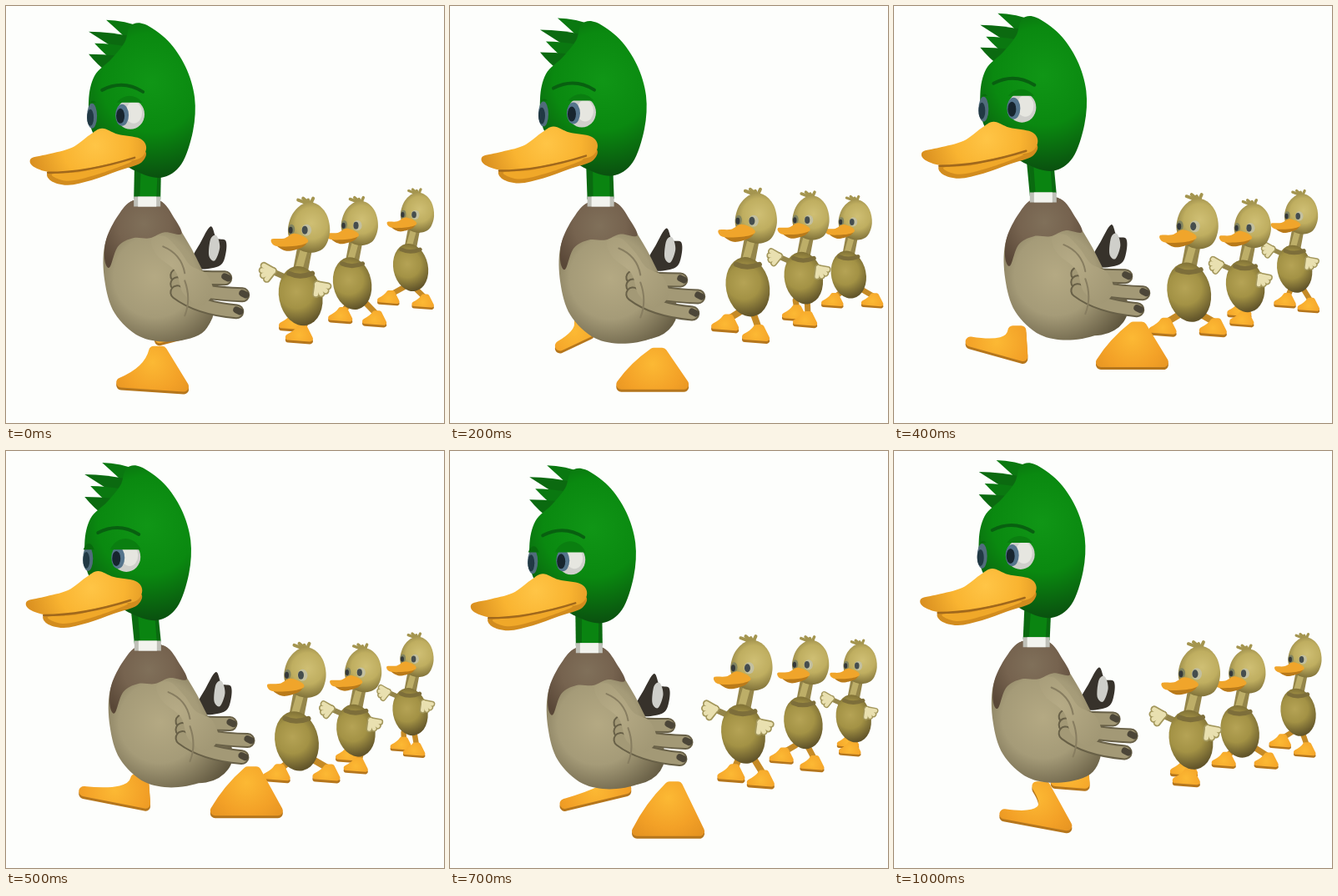
An HTML page with a canvas that plays this animation: 525 px wide and 500 px high, repeating every 1.1 s.

```html
<!DOCTYPE html>
<html lang="en">
<head>
<meta charset="utf-8">
<title>Duck walk</title>
<style>
html, body { margin: 0; width: 100%; height: 100%; overflow: hidden; background: #fdfefc; }
canvas { display: block; }
</style>
</head>
<body>
<canvas id="stage" width="525" height="500"></canvas>
<script>
const c = document.getElementById('stage').getContext('2d');
const STEP = 100, STEPS = 11;
const CHICKS = [
  { x: 491, y: 251, size: .8, delay: -3 },
  { x: 430, y: 258, size: .88, delay: 4.7 },
  { x: 365, y: 259, size: 1, delay: 0 }
];

// One swing per stride, largest at the given step
const swing = (step, peak) => Math.cos(2 * Math.PI * (step - peak) / STEPS);
const pulse = (step, peak, sharpness) => Math.max(0, swing(step, peak)) ** sharpness;

// A stride-long swing plus a bounce that comes twice per stride
const wave = (step, mean, sway, peak, bounce = 0, bouncePeak = 0) =>
  mean + sway * swing(step, peak) + bounce * swing(2 * step, 2 * bouncePeak);

// Closed curve through [x, y, x, y, ...]
function blob(p) {
  const n = p.length / 2, at = i => { i = (i + n) % n; return [p[2 * i], p[2 * i + 1]]; };
  c.beginPath();
  c.moveTo(p[0], p[1]);
  for (let i = 0; i < n; i++) {
    const [a, b, d, e] = [at(i - 1), at(i), at(i + 1), at(i + 2)];
    c.bezierCurveTo(b[0] + (d[0] - a[0]) / 6, b[1] + (d[1] - a[1]) / 6,
      d[0] - (e[0] - b[0]) / 6, d[1] - (e[1] - b[1]) / 6, d[0], d[1]);
  }
}

function fill(color) { c.fillStyle = color; c.fill(); }
function shape(p, color) { blob(p); fill(color); }

function oval(x, y, rx, ry, color, turn = 0) {
  c.beginPath();
  c.ellipse(x, y, rx, ry, turn, 0, 7);
  fill(color);
}

function line(p, width, color) {
  c.beginPath();
  c.moveTo(p[0], p[1]);
  if (p.length > 4) c.quadraticCurveTo(...p.slice(2));
  else c.lineTo(p[2], p[3]);
  c.lineWidth = width;
  c.strokeStyle = color;
  c.stroke();
}

function glow(x, y, r, ...colors) {
  const g = c.createRadialGradient(x, y, 0, x, y, r);
  colors.forEach((col, i) => g.addColorStop(i / (colors.length - 1), col));
  return g;
}

function shifted(x, y, draw, size = 1) {
  c.save();
  c.translate(x, y);
  c.scale(size, size);
  draw();
  c.restore();
}

// Webbed foot: toe, heel and ankle; arch pulls the instep in, a negative one bulges it
function foot(toeX, toeY, heelX, heelY, ankleX, ankleY, arch, thick) {
  const mx = (toeX + ankleX) / 2, my = (toeY + ankleY) / 2;
  const web = (dy, color) => {
    c.beginPath();
    c.moveTo(toeX, toeY + dy);
    c.quadraticCurveTo(mx + (heelX - mx) * arch, my + (heelY - my) * arch + dy, ankleX - thick / 3, ankleY + dy);
    c.lineTo(ankleX + thick / 2, ankleY + dy);
    c.lineTo(heelX, heelY + dy);
    c.closePath();
    c.lineWidth = thick;
    c.strokeStyle = color;
    c.stroke();
    fill(color);
  };
  web(1.5, '#b5761c');
  web(-1.5, glow((toeX + heelX) / 2, ankleY + thick, thick * 6, '#fcb934', '#f3a127', '#dd8b1e'));
}

function nearFoot(step) {
  const toe = wave(step, 199, 60, 4.8, 8, 7.55), sole = wave(step, 449, 11, 10, 10, 1.4);
  const arch = pulse(step, 10, 6), lift = 14 * arch;
  foot(toe, sole - lift, toe + 75, sole, toe + 43, sole - wave(step, 46, 8, 7.5), .95 * arch - .12, 12);
}

function farFoot(step) {
  const x = wave(step, 168, 45, 9.5), y = wave(step, 407, 11, 5.8);
  const half = wave(step, 26, 13, 6), tilt = wave(step, 2, 4, 10, 7.5, 1.6);
  foot(x - half, y + tilt, x + half, y - tilt, x + half - 8, y - 22, .6, 12);
}

function body(rump) {
  shape([222, 306, 232, 286, 245, 265, 252, 279, 263, 282, 263, 298, 256, 312, 232, 316], '#37322b');
  shape([243, 300, 245, 280, 252, 276, 256, 290, 250, 306], '#cfcfca');
  const tan = glow(178, 325, 98, '#b4a983', '#a59b78', '#5f563e');
  oval(212 + rump * .6, 362, 38 + rump * .4, 36, tan, .15);
  shape([152, 234, 134, 254, 118, 288, 118, 330, 130, 369, 160, 397, 200, 403,
    238, 390, 248, 352, 228, 303, 206, 265, 184, 234], tan);
  shape([152, 234, 134, 252, 120, 280, 118, 305, 124, 314, 134, 289, 152, 279,
    172, 279, 190, 272, 210, 274, 202, 256, 184, 234], glow(165, 262, 62, '#80705a', '#76634f', '#594737'));
  // Three fanned feathers, dark at the tip
  for (const [i, tipX] of [262, 283, 276].entries()) {
    const f = [205, 324 + 10 * i, 230, 327 + 18 * i, tipX, 327 + 20 * i];
    line(f, 18, '#686047');
    line(f, 14, '#a39976');
    line([tipX, f[5] - 2, tipX + 4, f[5]], 8, '#4c4638');
  }
  shape([174, 281, 190, 277, 207, 293, 221, 312, 240, 322, 248, 345, 232, 360, 212, 345, 203, 319, 181, 300],
    glow(198, 312, 60, '#b6ab86', '#a29875'));
  line([188, 289, 210, 298, 214, 321], 2, '#877d60');
  line([214, 330, 222, 352, 214, 372], 2, '#877d60');
}

function crest() {
  [[118, 15], [97, 29], [104, 43], [97, 56]].forEach(([x, y], i) => {
    const bx = 150 - 10 * i, by = 25 + 11 * i;
    c.beginPath();
    c.moveTo(x, y);
    c.quadraticCurveTo((x + bx) / 2 + 5, y, bx + 14, by);
    c.lineTo(bx, by + 20);
    c.quadraticCurveTo((x + bx) / 2, y + 14, x, y);
    fill(i % 2 ? '#0b6a10' : '#0a7810');
  });
}

function head(lid) {
  crest();
  shape([147, 22, 164, 20, 192, 40, 213, 71, 224, 108, 222, 148, 208, 188, 184, 204,
    153, 196, 124, 176, 101, 148, 97, 112, 104, 82, 124, 62, 140, 42],
    glow(172, 90, 118, '#109616', '#0a8910', '#0a4d0f'));
  oval(101, 130, 6, 15, '#516c7c');
  oval(99, 132, 4, 10, '#213944');
  oval(147, 128, 17, 18, '#cfcfcb');
  oval(151, 126, 10, 13, '#e6e6e0');
  oval(137, 129, 8, 13, '#55748c');
  oval(135, 130, 5, 9, '#17252e');
  // Lids slide down over both eyes
  c.save();
  c.beginPath();
  c.rect(90, 88, 80, 26 + 42 * lid);
  c.clip();
  oval(146, 128, 20, 22, '#0a7e10');
  oval(102, 130, 8, 18, '#086a0d');
  c.restore();
  line([113, 99, 138, 86, 162, 101], 4, '#086010');
  // Beak, lower half first
  shape([49, 197, 80, 190, 125, 180, 163, 172, 160, 186, 132, 196, 101, 207, 72, 213, 52, 208], '#d28c1e');
  shape([53, 200, 88, 197, 130, 186, 148, 185, 108, 200, 72, 208], '#f0a829');
  shape([28, 181, 48, 176, 77, 168, 98, 153, 113, 145, 132, 152, 158, 157, 166, 168,
    158, 181, 128, 186, 91, 194, 55, 198, 31, 191], glow(105, 165, 80, '#ffc546', '#f9b431', '#d98f20'));
  line([48, 198, 95, 198, 152, 180], 2.5, '#a0681c');
}

function duck(step) {
  const hx = wave(step, 4, 5, 1.2, 6, 3), hy = wave(step, -1.5, 0, 0, 5.5, .8);
  const bx = wave(step, 6, 8, 3, 5, 3.1), by = wave(step, -1, 2, 4, 4, 1);
  const nx = 168 + (hx + bx) / 2, ny = 231 + (hy + by) / 2;
  farFoot(step);
  nearFoot(step);
  shifted(bx, by, () => body(wave(step, 7, 9, 4.5)));
  c.lineCap = 'butt';
  line([168 + hx, 185 + hy, nx, ny], 32, '#0a6a10');
  line([170 + hx, 185 + hy, nx + 1, ny], 20, '#0a8411');
  line([nx, ny - 3, nx, ny + 9], 32, '#bfc0b8');
  line([nx, ny - 3, nx, ny + 9], 22, '#f2f3ee');
  c.lineCap = 'round';
  shifted(hx, hy, () => head(pulse(step, 6, 12)));
}

function hand(x, y, angle) {
  for (const [width, color] of [[9, '#a3975c'], [5.5, '#e9e0b0']])
    for (let i = 0; i < 4; i++) {
      const a = angle + i * .5;
      line([x, y, x + 13 * Math.cos(a), y + 12 * Math.sin(a)], width, color);
    }
}

function chickFoot(x, y, hipX) {
  line([hipX, 108, x + 4, y - 6], 8, '#c58a26');
  foot(x - 13, y + 4, x + 13, y + 6, x + 3, y - 7, .1, 7);
}

function chickBody() {
  line([-5, 20, -12, 57], 18, '#94854a');
  line([-7, 28, -13, 50], 9, '#bdae68');
  oval(-11, 83, 26, 36, glow(-16, 78, 40, '#b5a355', '#a39245', '#62552a'), -.2);
  line([-25, 56, -12, 62, 3, 56], 6, '#7d6e3a');
}

function chickHead() {
  for (let i = 0; i < 4; i++) line([-14 + 6 * i, -32 - i % 2 * 2, 0, -28, 4, -18], 4, '#a4954f');
  shape([-9, -27, 7, -28, 20, -15, 24, 6, 17, 25, 1, 31, -16, 25, -26, 8, -22, -13],
    glow(2, -4, 38, '#cfbf74', '#bfae60', '#766833'));
  oval(-22, 3, 4, 6, '#80835f');
  oval(-23, 4, 2.5, 4, '#35393a');
  oval(-4, 4, 6, 7, '#c3c0a0');
  oval(-6, 4, 3.5, 5, '#454d4e');
  shape([-40, 21, -18, 20, -4, 18, -10, 25, -28, 29], '#b97a1a');
  shape([-46, 15, -31, 14, -19, 8, -5, 13, -3, 19, -18, 23, -41, 23], '#f0a52b');
}

function chick({ x, y, size, delay }, time) {
  const step = time - delay, waving = swing(step, 9.7) > 0;
  shifted(x, y, () => {
    chickFoot(wave(step, -30, 13, 9.5), wave(step, 125, 4, 6), -18);
    chickFoot(wave(step, 2, 17, 4.8), wave(step, 133, 3, 10, 3, 1.4), -2);
    c.translate(wave(step, 0, 3, 0, 4, 3), wave(step, 0, 0, 0, 6, 5.2));
    if (waving) {
      line([-26, 62, -44, 54], 7, '#94854a');
      hand(-44, 53, 2.2);
    }
    chickBody();
    if (waving) hand(9, 69, .2);
    chickHead();
  }, size);
}

function draw(now) {
  const step = Math.floor(now / STEP) % STEPS;
  c.fillStyle = '#fdfefc';
  c.fillRect(0, 0, 525, 500);
  c.lineCap = c.lineJoin = 'round';
  CHICKS.forEach(k => chick(k, step));
  duck(step);
}

const start = performance.now();
function tick() {
  draw(performance.now() - start);
  requestAnimationFrame(tick);
}
tick();
</script>
</body>
</html>
```
